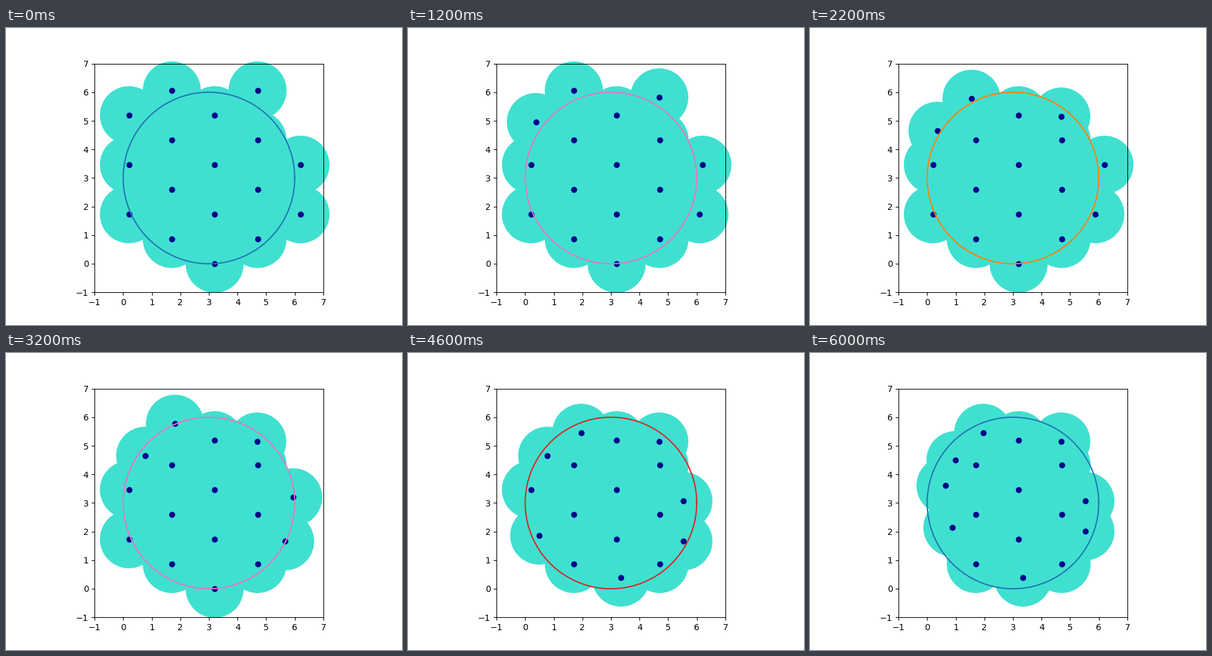
Recreate the animation shown at these times as a matplotlib script. Size 640 px wide and 480 px high, loop 6.2 s.

```python
import matplotlib.pyplot as plt
import numpy as np
from matplotlib.animation import FuncAnimation

FRAMES = 31
INTERVAL = 200
H = np.sqrt(3) / 2

# Hexagonal lattice, column by column: (x, lowest y, count)
COLUMNS = [(0.2, 2 * H, 3), (1.7, H, 4), (3.2, 0, 4), (4.7, H, 4), (6.2, 2 * H, 2)]
START = np.array([(x, y + 2 * H * k) for x, y, n in COLUMNS for k in range(n)])

LOW_LEFT, MID_LEFT, TOP_LEFT = 0, 1, 2
TOP, BOTTOM, TOP_RIGHT = 6, 7, 14
LOW_RIGHT, MID_RIGHT = 15, 16

# Accepted moves of the random search: (step, disc, x, y)
MOVES = [
    (2, TOP_LEFT, 0.372, 4.957),
    (4, TOP_RIGHT, 4.69, 5.82),
    (5, LOW_RIGHT, 6.095, 2 * H),
    (7, TOP_RIGHT, 4.69, 5.48),
    (8, TOP, 1.55, 5.773),
    (9, LOW_RIGHT, 5.88, 2 * H),
    (10, TOP_LEFT, 0.36, 4.654),
    (11, TOP_RIGHT, 4.69, 5.15),
    (12, MID_RIGHT, 6.065, 3.33),
    (13, TOP_LEFT, 0.77, 4.654),
    (14, LOW_RIGHT, 5.665, 1.66),
    (15, MID_RIGHT, 5.945, 3.20),
    (16, TOP, 1.81, 5.773),
    (17, LOW_LEFT, 0.388, 2 * H),
    (18, TOP, 1.98, 5.773),
    (19, BOTTOM, 3.35, 0.39),
    (20, LOW_RIGHT, 5.535, 1.66),
    (21, TOP, 1.96, 5.455),
    (22, MID_RIGHT, 5.535, 3.07),
    (23, LOW_LEFT, 0.49, 1.86),
    (24, LOW_RIGHT, 5.535, 2.01),
    (25, LOW_LEFT, 0.68, 2.0),
    (27, MID_LEFT, 0.64, 3.61),
    (28, TOP_LEFT, 0.99, 4.502),
    (29, LOW_LEFT, 0.88, 2.14),
]

fig, ax = plt.subplots(figsize=(6.4, 4.8), dpi=100)
ax.set_aspect("equal")
ax.set(xlim=(-1, 7), ylim=(-1, 7), xticks=range(-1, 8), yticks=range(-1, 8))

discs = [
    ax.add_patch(plt.Circle(p, 1, color="turquoise", clip_on=False)) for p in START
]
dots = ax.scatter(*START.T, color="darkblue")
angle = np.linspace(0, 2 * np.pi, 200)
(ring,) = ax.plot(3 + 3 * np.cos(angle), 3 + 3 * np.sin(angle))


def centers(step):
    pts = START.copy()
    for when, disc, x, y in MOVES:
        if when <= step:
            pts[disc] = x, y
    return pts


def update(step):
    pts = centers(step)
    for disc, p in zip(discs, pts):
        disc.center = p
    dots.set_offsets(pts)
    ring.set_color(f"C{step % 10}")
    return [*discs, dots, ring]


anim = FuncAnimation(
    fig,
    update,
    frames=FRAMES,
    init_func=lambda: update(0),
    interval=INTERVAL,
    repeat=True,
    repeat_delay=0,
)
plt.show()
```
